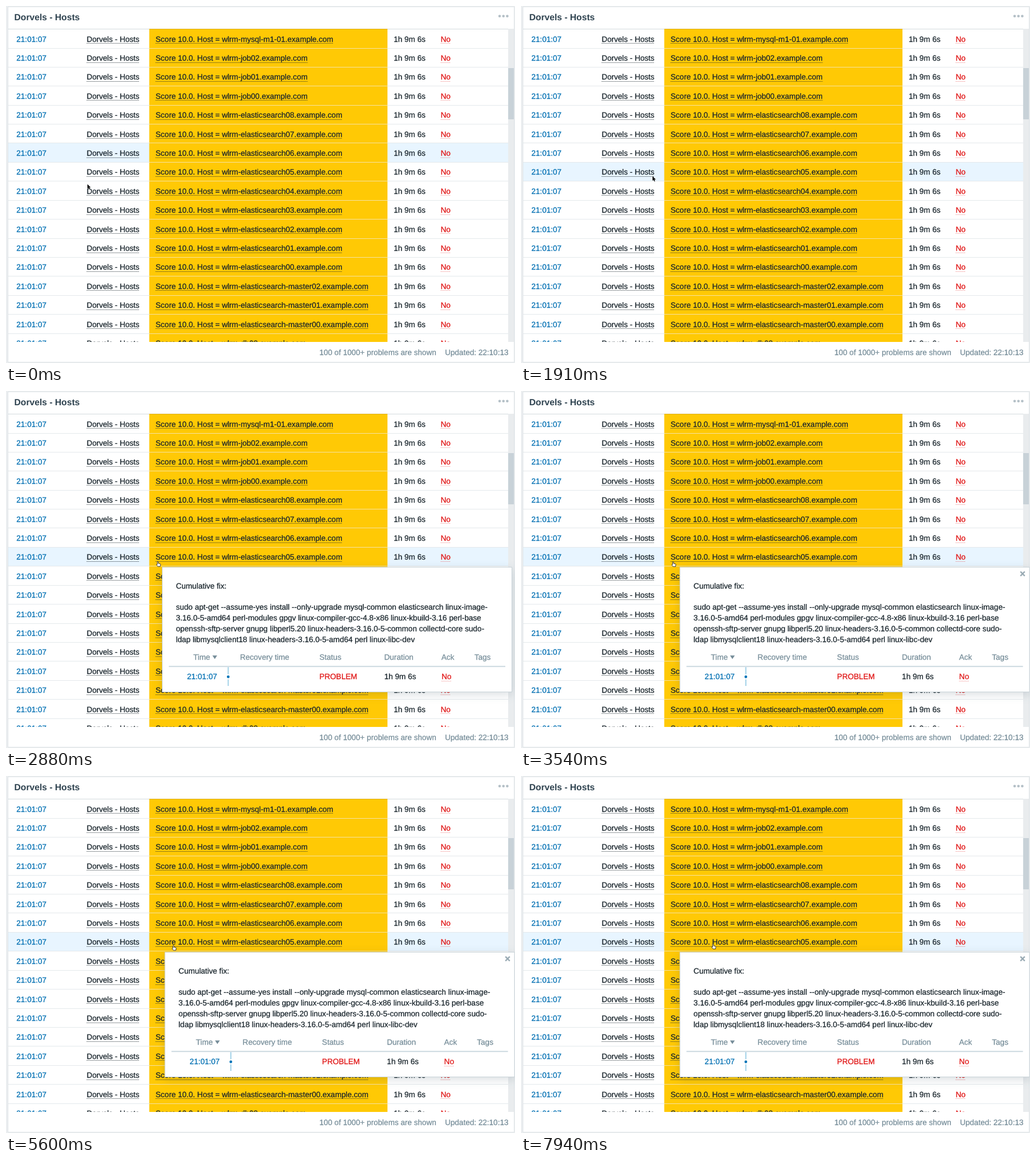
An HTML page for the animation above (8 s loop, 894 by 627 pixels).

```html
<!DOCTYPE html>
<html lang="en">
<head>
<meta charset="utf-8">
<title>Dorvels - Hosts</title>
<style>
  html, body { margin: 0; width: 100%; height: 100%; overflow: hidden; background: #ebeef0; }
  svg { display: block; }
  text {
    font: 13.55px "Liberation Sans", Arial, sans-serif;
    text-rendering: geometricPrecision; white-space: pre; stroke-width: .28px;
  }
  .title { font-size: 15.7px; font-weight: bold; stroke: none; }
  .panel { fill: #fff; stroke: #c9d3d8; filter: drop-shadow(0 4px 8px rgba(30, 60, 75, .17)); }
</style>
</head>
<body>
<svg width="894" height="627" viewBox="0 0 894 627">
  <clipPath id="view"><rect x="3" y="39" width="890" height="551"/></clipPath>
  <rect x="3.5" y="1.5" width="889" height="624" fill="#fff" stroke="#dfe4e7"/>
  <g fill="#b4c0c7">
    <circle cx="867" cy="17.7" r="2.3"/><circle cx="873.7" cy="17.7" r="2.3"/><circle cx="880.4" cy="17.7" r="2.3"/>
  </g>
  <g id="table" clip-path="url(#view)">
    <rect id="hover" x="4" width="878" height="33.4" fill="#e8f5ff"/>
    <rect x="251.6" y="40" width="418.4" height="550" fill="#ffc905"/>
  </g>
  <rect x="882" y="40" width="10" height="550" fill="#e9ecee"/>
  <rect x="882" y="109" width="10" height="90" fill="#c8d2d8"/>
  <g id="popup">
    <rect class="panel" x="274.5" y="309.5" width="614" height="219"/>
    <path d="M362.5 464.5h8.4l-4.2 6.3z" fill="#768d99"/>
    <path d="M286 483.7H877" stroke="#ccd9e0" stroke-width="2"/>
    <path d="M390.3 485V497.5M390.3 506.5V518" stroke="#a3d2e8" stroke-width="2"/>
    <circle cx="390.3" cy="502" r="2.4" fill="#0275b8"/>
    <path id="close" d="M872.6 317.2l7.6 7.6m0-7.6l-7.6 7.6" stroke="#9aabb4" stroke-width="2.4"/>
  </g>
  <g id="cursor">
    <path id="arrow" d="M0 0V8L1.9 6.3 3.1 9.2 4.5 8.6 3.3 5.8H5.8z" stroke="#fff" stroke-width=".6" paint-order="stroke"/>
    <path id="hand" d="M2 5.2V1.2a.9.9 0 0 1 1.8 0V3.4l3 .6q1 .3 .9 1.4L7 8.8H3L.7 6.2Q.3 5 1.2 5z" fill="#fff" stroke="#222" stroke-width=".9"/>
  </g>
</svg>
<script>
const INK = '#1a262d', SLATE = '#2f4350', BLUE = '#0270b3', RED = '#e01414', GREY = '#768d99';
const ROW = 33.4, TOP = 40.6, LOOP = 8000;
const $ = id => document.getElementById(id);
const svg = document.querySelector('svg'), table = $('table'), popup = $('popup');

function add(parent, tag, attrs, content = '') {
  const el = document.createElementNS('http://www.w3.org/2000/svg', tag);
  for (const key in attrs) el.setAttribute(key, attrs[key]);
  el.textContent = content;
  return parent.appendChild(el);
}

const label = (parent, x, y, content, fill = INK) =>
  add(parent, 'text', { x, y, fill, stroke: fill }, content);

const line = (parent, x, y, width, stroke, more) =>
  add(parent, 'path', { d: `M${x} ${Math.floor(y) + 0.5}h${width}`, stroke, ...more });

function dotted(parent, x, y, content, fill = INK, opacity = 0.9) {
  const width = label(parent, x, y, content, fill).getComputedTextLength();
  line(parent, x, y + 3.2, width, fill, { opacity, 'stroke-dasharray': '1.1 1.1' });
}

// Panel title and footer
label(svg, 14.5, 25.4, 'Dorvels - Hosts', SLATE).classList.add('title');
label(svg, 550.5, 612.8, '100 of 1000+ problems are shown', GREY);
label(svg, 771, 612.8, 'Updated: 22:10:13', GREY);

// Problem list
const numbered = (name, last) =>
  Array.from({ length: last + 1 }, (_, i) => name + String(last - i).padStart(2, '0'));
const hosts = ['mysql-m1-01', ...numbered('job', 2), ...numbered('elasticsearch', 8),
  ...numbered('elasticsearch-master', 2), 'db03'];

hosts.forEach((host, i) => {
  const top = TOP + i * ROW, y = top + 21.9;
  line(table, 4, top, 878, i ? '#e4e9ec' : '#d3dade');
  line(table, 251.6, top, 418.4, i ? '#f5e2a2' : '#dcae20');
  label(table, 18.3, y, '21:01:07', BLUE);
  dotted(table, 141.7, y, 'Dorvels - Hosts');
  dotted(table, 262.8, y, `Score 10.0. Host = wlrm-${host}.example.com`);
  label(table, 681, y, '1h 9m 6s');
  dotted(table, 763.5, y, 'No', RED, 0.5);
});

// Problem details
[
  'Cumulative fix:',
  '',
  'sudo apt-get --assume-yes install --only-upgrade mysql-common elasticsearch linux-image-',
  '3.16.0-5-amd64 perl-modules gpgv linux-compiler-gcc-4.8-x86 linux-kbuild-3.16 perl-base',
  'openssh-sftp-server gnupg libperl5.20 linux-headers-3.16.0-5-common collectd-core sudo-',
  'ldap libmysqlclient18 linux-headers-3.16.0-5-amd64 perl linux-libc-dev'
].forEach((text, i) => label(popup, 298.5, 347 + i * 18.7, text));

[[329, 'Time'], [411, 'Recovery time'], [550.5, 'Status'], [664.3, 'Duration'], [764.8, 'Ack'], [822.7, 'Tags']]
  .forEach(([x, name]) => label(popup, x, 471.6, name, GREY));
label(popup, 318, 506, '21:01:07', BLUE);
label(popup, 550.5, 506, 'PROBLEM', RED);
label(popup, 664.5, 506, '1h 9m 6s');
dotted(popup, 765, 506, 'No', RED, 0.5);

svg.append(popup, $('cursor'));

// Pointer moves: first step (ms), last step (ms), step count, target x, target y
const moves = [
  [500, 500, 1, 144, 313],
  [730, 820, 2, 147.5, 306.8],
  [1300, 1910, 8, 231, 299],
  [2260, 2790, 7, 263.8, 299.4],
  [3060, 3060, 1, 264.3, 299.6],
  [4440, 4440, 1, 268.4, 297],
  [4530, 5240, 9, 320, 297.4],
  [5330, 5960, 8, 262.5, 297.2],
  [6230, 6770, 7, 319, 297.5],
  [6950, 6950, 1, 321.5, 297.3],
  [7760, 7940, 3, 334.5, 295]
];

function pointerAt(t) {
  let x = 143, y = 313;
  for (const [first, last, steps, toX, toY] of moves) {
    if (t < first) break;
    const gap = (last - first) / (steps - 1) || 1;
    const done = Math.min(steps, Math.floor((t - first) / gap + 1.001)) / steps;
    x += (toX - x) * done;
    y += (toY - y) * done;
  }
  return [x, y];
}

const show = (id, on) => $(id).setAttribute('visibility', on ? 'visible' : 'hidden');

function draw() {
  const t = performance.now() % LOOP;
  const [x, y] = pointerAt(t);
  const open = t >= 2880, pinned = t >= 3540, onLink = x >= 262;
  $('hover').setAttribute('y', TOP + ROW * (t < 1030 ? 6 : 7));
  $('cursor').setAttribute('transform', `translate(${x} ${y})`);
  show('arrow', !onLink);
  show('hand', onLink);
  popup.setAttribute('transform', `translate(${pinned ? 4.6 : 0} 0)`);
  show('popup', open);
  show('close', pinned);
  requestAnimationFrame(draw);
}
draw();
</script>
</body>
</html>
```
